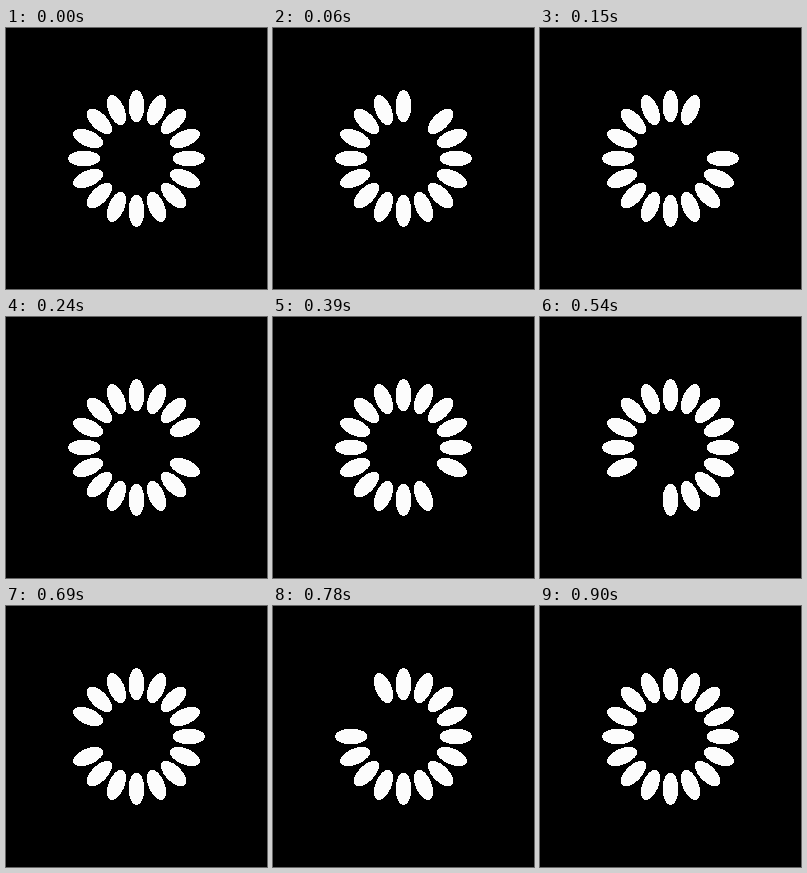
These frames come from a looping animation (261x261 px, 0.93 s). An HTML page without scripts:

```html
<!DOCTYPE html>
<html lang="en">
<head>
<meta charset="utf-8">
<title>Petal spinner</title>
<style>
  html, body { margin: 0; width: 100%; height: 100%; overflow: hidden; background: #000; }
  svg { display: block; width: 100vw; height: 100vh; }

  /* --i: place clockwise from the top, --tick: 30 ms step at which the petal goes dark */
  use {
    --tick: calc(2 * var(--i) - 1);
    fill: #fcfcfc;
    shape-rendering: crispEdges;
    transform: rotate(calc(var(--i) * 22.5deg));
    animation: dark3 930ms step-end calc(var(--tick) * 30ms - 1ms) infinite;
  }
  .late { --tick: calc(2 * var(--i) - 2); }
  .first { --tick: 1; animation-name: dark1; }
  .middle { --tick: 14; animation-name: dark1; }
  .last { animation-name: dark2; }

  /* Dark for one, two or three of the 31 steps */
  @keyframes dark1 { 0% { visibility: hidden; } 3.225%, 100% { visibility: visible; } }
  @keyframes dark2 { 0% { visibility: hidden; } 6.451%, 100% { visibility: visible; } }
  @keyframes dark3 { 0% { visibility: hidden; } 9.677%, 100% { visibility: visible; } }
</style>
</head>
<body>
<svg viewBox="-130.5 -130.5 261 261">
  <defs><ellipse id="petal" cy="-52.4" rx="8" ry="16"/></defs>
  <use href="#petal" style="--i:0" class="first"/>
  <use href="#petal" style="--i:1"/>
  <use href="#petal" style="--i:2"/>
  <use href="#petal" style="--i:3"/>
  <use href="#petal" style="--i:4"/>
  <use href="#petal" style="--i:5"/>
  <use href="#petal" style="--i:6"/>
  <use href="#petal" style="--i:7" class="middle"/>
  <use href="#petal" style="--i:8" class="late"/>
  <use href="#petal" style="--i:9" class="late"/>
  <use href="#petal" style="--i:10" class="late"/>
  <use href="#petal" style="--i:11" class="late"/>
  <use href="#petal" style="--i:12" class="late"/>
  <use href="#petal" style="--i:13" class="late"/>
  <use href="#petal" style="--i:14" class="late"/>
  <use href="#petal" style="--i:15" class="late last"/>
</svg>
</body>
</html>
```
